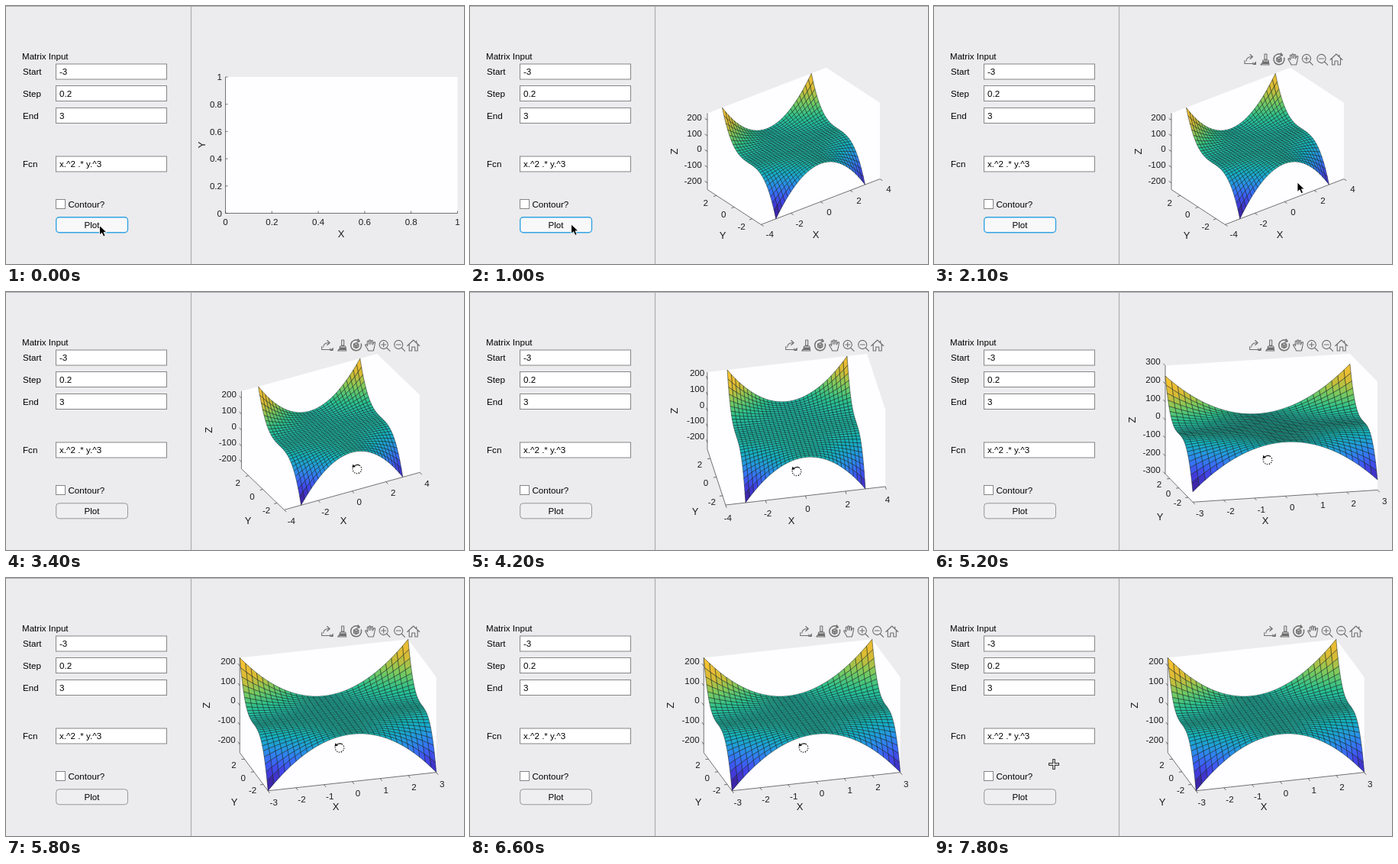
Animation, 600 px wide and 338 px high, one loop 8 s. Source, as an HTML page:

```html
<!DOCTYPE html>
<html lang="en">
<head>
<meta charset="utf-8">
<title>Surface plot app</title>
<style>
html, body { margin: 0; width: 100%; height: 100%; overflow: hidden; background: #ecebed; }
svg { display: block; width: 600px; height: 338px; font: 11.6px "Liberation Sans", Arial, sans-serif; fill: #000; }
text { stroke: none; }
.ax { fill: #1c1c1c; }
.line { fill: none; stroke: #3a3a3a; stroke-width: .7; }
.mid { text-anchor: middle; }
.end { text-anchor: end; }
.big { font-size: 13px; }
.box { fill: #fff; stroke: #868688; }
#surf path { stroke: #0a1a18; stroke-width: .48; stroke-linejoin: round; }
#tools { fill: none; stroke: #6e6e6e; stroke-width: 1.1; stroke-linecap: round; stroke-linejoin: round; }
</style>
</head>
<body>
<svg viewBox="0 0 600 338">
  <rect width="600" height="338" fill="#ecebed"/>
  <path d="M0 .5H600M242.5 0V338" stroke="#adadaf" stroke-width="1.2"/>
  <g id="form"></g>
  <g id="axes"></g>
  <g id="surf"></g>
  <g id="tools">
    <g transform="translate(413 70)">
      <path d="M-6 1.5V5.5H5V4M-4 2C-4-2 0-3.5 3-3.5M1-6.5 4.5-3.5 1-.5"/>
      <path d="M4 7H9L9 2.5Z" fill="#6e6e6e" stroke="none"/>
    </g>
    <g transform="translate(434 70)">
      <path d="M-1-7H2V0H-1ZM-3 1H4L5 7H-6Q-3 5-3 1Z"/>
      <path d="M-3 2.5H4.5L5 6H-4Z" fill="#6e6e6e" stroke="none"/>
    </g>
    <g transform="translate(452 70)">
      <path d="M3.5-6.2A7 7 0 1 0 6.7-2M2.5-8 4.5-5.5 1.5-4.5" stroke-width="1.5"/>
      <path d="M0-3.5 3.2-1.8V2L0 3.8-3.2 2V-1.8ZM-3.2-1.8 0 0 3.2-1.8M0 0V3.8" fill="#a2a2a2"/>
    </g>
    <path transform="translate(471 70)" d="M-3 7C-4 4-6 2-7-.5-6.5-2-5-1.5-4 .5L-4.5-5C-4-6.5-2.6-6-2.4-5L-2-1.5V-6.2C-1.5-7.6 0-7.3.2-6.2V-1.5L1-6C1.8-7 3-6.5 2.8-5.2L2.6-1 4.2-4C5.2-4.8 6.2-4 5.8-3L4.7 3 3.5 7Z"/>
    <path transform="translate(489 70)" d="M4.6-1A5.6 5.6 0 1 1-6.6-1A5.6 5.6 0 1 1 4.6-1M3 3 7.3 7.3M-4-1H2M-1-4V2"/>
    <path transform="translate(508.5 70)" d="M4.6-1A5.6 5.6 0 1 1-6.6-1A5.6 5.6 0 1 1 4.6-1M3 3 7.3 7.3M-4-1H2"/>
    <path transform="translate(527 70)" d="M-8 .5 0-7 8 .5M4-6V-3.5M-5.5-1.5V7H-2V2H2V7H5.5V-1.5"/>
  </g>
  <g id="cursor">
    <path id="arrow" d="M0 0V12.5L3 9.8 5.2 14.6 7.6 13.5 5.5 8.9H9.4Z" fill="#000" stroke="#fff" stroke-width=".9"/>
    <g id="spin" fill="none" stroke="#111">
      <path d="M-2.5-5.2A5.8 5.8 0 1 1-5.4-2" stroke="#fff" stroke-width="3" opacity=".7"/>
      <path d="M3-5A5.8 5.8 0 1 1-5.7-1" stroke-width="1.2" stroke-dasharray="1.4 1.5"/>
      <path d="M3-5Q0-6.5-3.5-4.2" stroke-width="1.3"/>
      <path d="M-6.5-1.8-5.6-6.3-2-3Z" fill="#111" stroke="none"/>
    </g>
    <g id="cross">
      <path d="M-7 0H7M0-7V7" stroke="#111" stroke-width="3.4"/>
      <path d="M-6.2 0H6.2M0-6.2V6.2" stroke="#fff" stroke-width="1.4"/>
    </g>
  </g>
</svg>
<script>
const LOOP = 8000, PLOT_AT = 250, PRESS_AT = 2500;
const $ = id => document.getElementById(id);
const lerp = (a, b, u) => a + (b - a) * u;
const ease = u => u * u * (3 - 2 * u);
const clamp = u => Math.min(1, Math.max(0, u));
const label = (x, y, s, cls = "", extra = "") =>
  `<text x="${x.toFixed(2)}" y="${(y + 4.2).toFixed(2)}" class="${cls}" ${extra}>${s}</text>`;
const line = (...pts) => `<path class="line" d="M${pts.map(p => p.map(v => v.toFixed(2))).join("L")}"/>`;
const show = (id, on) => { $(id).style.display = on ? "" : "none"; };

// Camera poses: time, azimuth, elevation, plot height, centre, X label x, Y label x/y, pointer
const poses = [
  [2650, 37.5, 30, 205.5, 424, 183.6, 453, 331, 301, 476, 231],
  [3400, 28.2, 31, 204.4, 425.2, 183.2, 442, 317, 300, 460, 232],
  [4200, 11, 36.4, 198.1, 427.5, 180, 421, 295, 288, 428, 235],
  [5200, 14.2, 15, 194.5, 442, 178, 434, 296, 295, 437, 220],
  [5800, 15.9, 22.6, 198.5, 435, 179.5, 432, 299, 294, 437, 222.5]
];

function poseAt(t) {
  const last = poses.length - 1;
  if (t <= poses[0][0]) return poses[0];
  if (t >= poses[last][0]) return poses[last];
  const i = poses.findIndex(p => p[0] > t);
  const a = poses[i - 1], b = poses[i];
  const u = (t - a[0]) / (b[0] - a[0]);
  return a.map((v, k) => lerp(v, b[k], u));
}

// Orthographic box, 1.7 : 1 : 1
function makeView(pose) {
  const [, azDeg, elDeg, height, cx, cy] = pose;
  const az = azDeg * Math.PI / 180, el = elDeg * Math.PI / 180;
  const sa = Math.sin(az), ca = Math.cos(az), se = Math.sin(el), ce = Math.cos(el);
  const size = height / (se * (1.7 * sa + ca) + ce), wide = 1.7 * size;
  const xl = wide * ca > 216 ? 3 : 4;
  const zl = size * ce > 133 ? 300 : 243;
  const ux = [wide * ca / (2 * xl), -wide * sa * se / (2 * xl)];
  const uy = [-size * sa / 6, -size * ca * se / 6];
  const uz = -size * ce / (2 * zl);
  const at = (x, y, z) => [cx + x * ux[0] + y * uy[0], cy + x * ux[1] + y * uy[1] + z * uz];
  return { at, ux, uy, xl, zl };
}

const parula = [
  [62, 38, 168], [66, 62, 226], [58, 106, 248], [39, 148, 230], [20, 178, 192],
  [42, 194, 142], [126, 202, 92], [212, 187, 52], [242, 190, 52], [247, 215, 40]
];
function colour(z) {
  const f = clamp((z + 243) / 486) * 9, i = Math.min(8, Math.floor(f));
  return `rgb(${parula[i].map((v, k) => Math.round(lerp(v, parula[i + 1][k], f - i)))})`;
}

// Faces run from the far corner to the near one
const N = 30;
const grid = i => -3 + i * 0.2;
const height = (x, y) => x * x * y ** 3;
const faces = [];
for (let j = N - 1; j >= 0; j--) {
  for (let i = N - 1; i >= 0; i--) {
    const el = document.createElementNS("http://www.w3.org/2000/svg", "path");
    el.setAttribute("fill", colour(height(grid(i), grid(j))));
    $("surf").append(el);
    faces.push({ el, i, j });
  }
}

function drawSurface(view) {
  const pts = [];
  for (let j = 0; j <= N; j++) {
    for (let i = 0; i <= N; i++) {
      const x = grid(i), y = grid(j);
      pts.push(view.at(x, y, height(x, y)).map(v => v.toFixed(2)).join(" "));
    }
  }
  for (const { el, i, j } of faces) {
    const k = j * (N + 1) + i;
    el.setAttribute("d", `M${pts[k]}L${pts[k + 1]}L${pts[k + N + 2]}L${pts[k + N + 1]}Z`);
  }
}

function unit([x, y]) {
  const d = Math.hypot(x, y);
  return [x / d, y / d];
}

function drawAxes3d(view, pose) {
  const { at, xl, zl } = view;
  const dx = unit(view.ux), dy = unit(view.uy);
  const front = at(-xl, -3, -zl), right = at(xl, -3, -zl), left = at(-xl, 3, -zl), top = at(-xl, 3, zl);
  const wall = [front, right, at(xl, -3, zl), at(xl, 3, zl), top, left];
  let s = `<polygon fill="#fefdff" points="${wall.join(" ")}"/>` + line(top, left, front, right);
  const tick = (p, d, k) => line(p, [p[0] + d[0] * k, p[1] + d[1] * k]);

  const step = xl === 3 ? 1 : 2;
  for (let x = -xl; x <= xl; x += step) {
    const p = at(x, -3, -zl);
    s += tick(p, dy, -4) + label(p[0] - 2 - dy[0] * 16, p[1] + 8 - dy[1] * 9, x, "ax mid");
  }
  for (let y = -2; y <= 2; y += 2) {
    const p = at(-xl, y, -zl);
    s += tick(p, dx, -4) + label(p[0] - 14, p[1] + 6.5 - dx[1] * 9, y, "ax mid");
  }
  const zMax = Math.floor(zl / 100) * 100;
  for (let z = -zMax; z <= zMax; z += 100) {
    const p = at(-xl, 3, z);
    s += tick(p, dy, 4) + label(p[0] - 1.5 + dy[0] * 7, p[1] + 3.2 + dy[1] * 12, z, "ax end");
  }
  const zx = left[0] - 43, zy = (left[1] + top[1]) / 2;
  s += label(pose[6], 299.5, "X", "ax mid big") + label(pose[7], pose[8], "Y", "ax mid big");
  s += label(zx, zy, "Z", "ax mid big", `transform="rotate(-90 ${zx} ${zy})"`);
  $("axes").innerHTML = s;
}

function drawAxes2d() {
  let s = `<rect x="287.5" y="93" width="304" height="178.5" fill="#fefdff"/>`;
  s += line([287.5, 93], [287.5, 271.5], [591.5, 271.5]);
  for (let k = 0; k <= 5; k++) {
    const x = 287.5 + k * 60.8, y = 271.5 - k * 35.7, v = k / 5;
    s += line([x, 271.5], [x, 268.5]) + line([287.5, y], [290.5, y]);
    s += label(x, 283, v, "ax mid") + label(283, y, v, "ax end");
  }
  s += label(439, 299, "X", "ax mid big") + label(257, 182, "Y", "ax mid big", `transform="rotate(-90 257 182)"`);
  $("axes").innerHTML = s;
}

function drawForm() {
  const rows = [["Start", "-3", 86], ["Step", "0.2", 114.5], ["End", "3", 143.5], ["Fcn", "x.^2 .* y.^3", 207]];
  let s = label(21, 66, "Matrix Input");
  for (const [name, value, y] of rows) {
    s += label(22, y, name);
    s += `<rect class="box" x="65.5" y="${y - 10}" width="145" height="20"/>` + label(70, y, value);
  }
  s += `<rect class="box" x="65.5" y="253.5" width="12" height="12"/>` + label(81.5, 259.5, "Contour?");
  s += `<rect id="plot" x="65.7" y="276.8" width="93.8" height="20" rx="4"/>` + label(112.5, 287, "Plot", "mid");
  $("form").innerHTML = s;
}

function drawCursor(t, pose) {
  let x, y, kind = "arrow";
  if (t < PRESS_AT) {
    const u = ease(clamp((t - 900) / 1000));
    x = lerp(122.5, 476, u);
    y = lerp(287.5, 231, u);
  } else {
    const u = ease(clamp((t - 7430) / 350));
    x = lerp(pose[9], 157, u);
    y = lerp(pose[10], 244, u);
    kind = x < 290 ? "cross" : "spin";
  }
  $("cursor").setAttribute("transform", `translate(${x.toFixed(2)} ${y.toFixed(2)})`);
  for (const id of ["arrow", "spin", "cross"]) show(id, id === kind);
}

let drawn = null;
function render(t) {
  const pose = poseAt(t), plotted = t >= PLOT_AT;
  const key = plotted ? pose.join() : "flat";
  if (key !== drawn) {
    drawn = key;
    if (plotted) {
      const view = makeView(pose);
      drawAxes3d(view, pose);
      drawSurface(view);
    } else drawAxes2d();
  }
  show("surf", plotted);

  const focus = t < PRESS_AT;
  $("plot").setAttribute("fill", focus ? "#f8f8f9" : "#efeef0");
  $("plot").setAttribute("stroke", focus ? "#32a5e4" : "#969698");
  $("plot").setAttribute("stroke-width", focus ? 1.4 : 1);

  show("tools", t >= 1850);
  const shift = t < 3000 ? 0 : t < 6500 ? 6.7 : 25.8;
  $("tools").setAttribute("transform", `translate(${shift} 0)`);
  drawCursor(t, pose);
}

drawForm();
const start = performance.now();
function loop() {
  render((performance.now() - start) % LOOP);
  requestAnimationFrame(loop);
}
loop();
</script>
</body>
</html>
```
